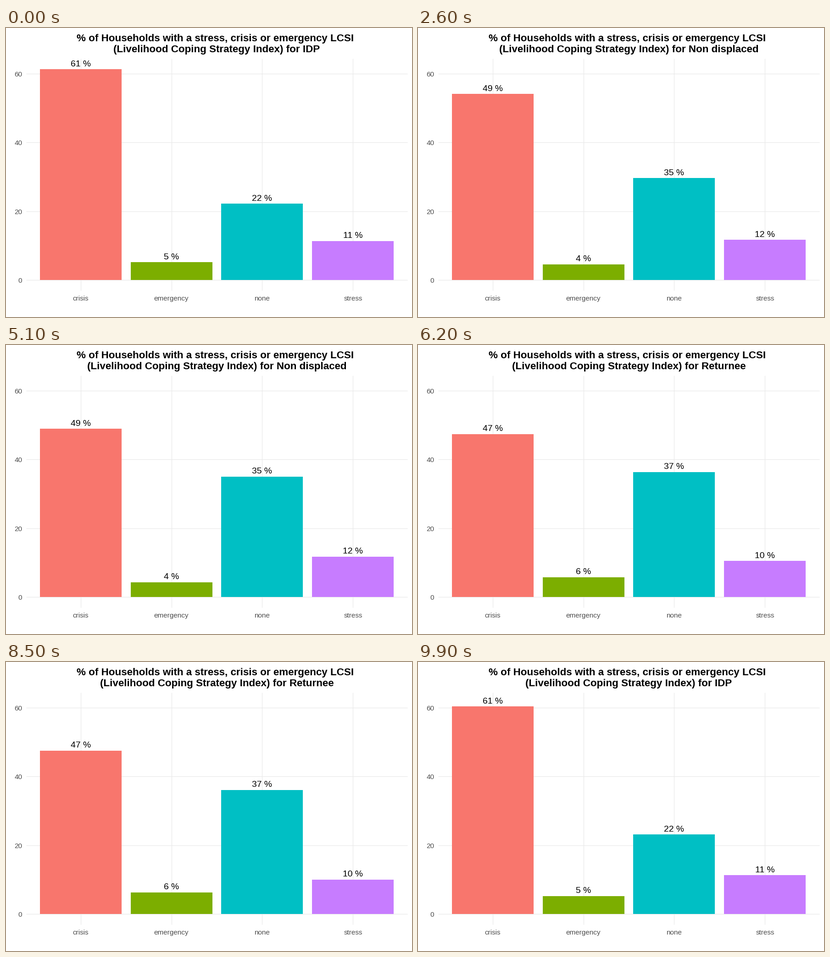
Write a matplotlib script that moves like this. It is 885 px wide and 632 px high and loops after 10 s.

```python
import matplotlib.pyplot as plt
from matplotlib.animation import FuncAnimation
from matplotlib.patches import Rectangle

W, H, DPI = 885, 632, 64
PT = 72 / DPI                       # points per pixel
FRAMES, INTERVAL = 100, 100

plt.rcParams["font.family"] = "Liberation Sans"

CATEGORIES = ["crisis", "emergency", "none", "stress"]
COLORS = ["#F8766D", "#7CAE00", "#00BFC4", "#C77CFF"]
GROUPS = ["IDP", "Non displaced", "Returnee"]
VALUES = [
    [61.23, 5.15, 22.20, 11.38],
    [49.05, 4.20, 34.85, 11.85],
    [46.62, 6.38, 36.95, 9.95],
]
# Last still frame and length in frames of each move to the next group
MOVES = [(16, 17), (50, 17), (84, 16)]

LEFT, RIGHT, TOP, BOTTOM = 44, 875, 67, 574
ZERO, UNIT = 551.2, 7.525
STEP = (RIGHT - LEFT) / 4.2
BAR = 0.9 * STEP
CENTERS = [LEFT + (0.6 + i) * STEP for i in range(4)]
MID = (LEFT + RIGHT) / 2

fig = plt.figure(figsize=(W / DPI, H / DPI), dpi=DPI, facecolor="white")
ax = fig.add_axes([0, 0, 1, 1])
ax.set_xlim(0, W)
ax.set_ylim(H, 0)
ax.axis("off")


def y_px(value):
    return ZERO - UNIT * value


def text(x, y, s, size, color="black", ha="center", weight="normal"):
    return ax.text(x, y, s, fontsize=size * PT, color=color, ha=ha,
                   va="baseline", weight=weight, zorder=3)


def grid_line(xs, ys):
    ax.plot(xs, ys, color="#EBEBEB", lw=1.4 * PT, zorder=1,
            solid_capstyle="butt")


for tick in (0, 20, 40, 60):
    y = y_px(tick)
    grid_line([LEFT, RIGHT], [y, y])
    text(35.2, y + 6, str(tick), 15.2, "#4D4D4D", ha="right")

for x, name in zip(CENTERS, CATEGORIES):
    grid_line([x, x], [TOP, BOTTOM])
    text(x, 596, name, 15.2, "#4D4D4D")

text(MID - 3, 28.5, "% of Households with a stress, crisis or emergency LCSI",
     22.4, weight="bold")
subtitle = text(MID, 52.5, "", 22.4, weight="bold")

bars = [ax.add_patch(Rectangle((x - BAR / 2, ZERO), BAR, 0, fc=c, lw=0, zorder=2))
        for x, c in zip(CENTERS, COLORS)]
labels = [text(x, ZERO, "", 19.2) for x in CENTERS]


def state(n):
    """Return the two groups being blended and the linear progress."""
    for i, (start, length) in enumerate(MOVES):
        if n <= start + length:
            return i, (i + 1) % 3, max(0.0, (n - start) / length)


def update(n):
    a, b, t = state(n)
    shown = b if t >= 0.5 else a
    subtitle.set_text(f"(Livelihood Coping Strategy Index) for {GROUPS[shown]}")
    for i, (bar, label) in enumerate(zip(bars, labels)):
        value = VALUES[a][i] + (VALUES[b][i] - VALUES[a][i]) * t
        top = y_px(value)
        bar.set_y(top)
        bar.set_height(ZERO - top)
        label.set_y(top - 6.6)
        label.set_text(f"{VALUES[shown][i]:.0f} %")
    return [subtitle, *bars, *labels]


anim = FuncAnimation(fig, update, frames=FRAMES, interval=INTERVAL,
                     repeat=True, repeat_delay=0, blit=False)
plt.show()
```
